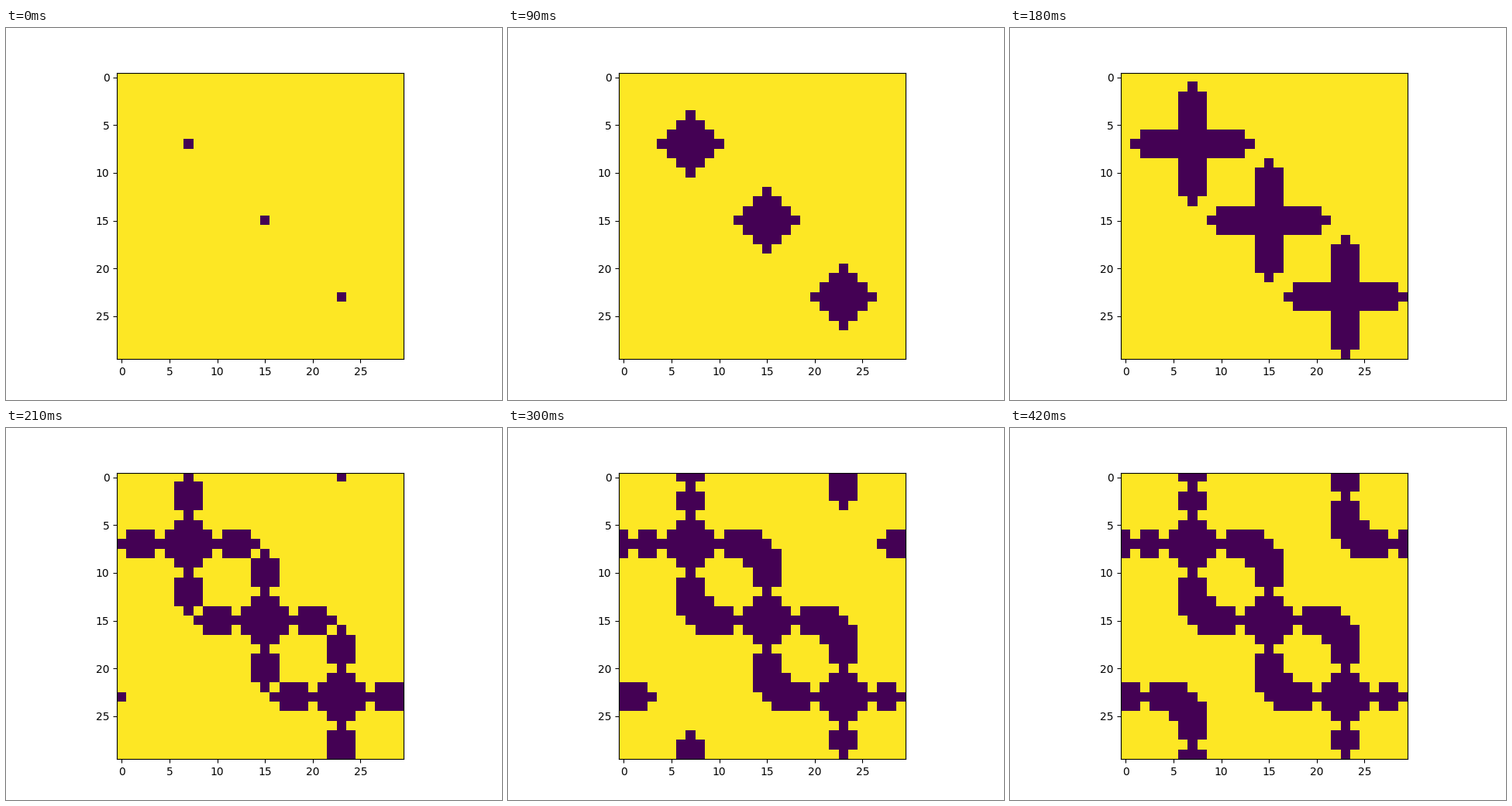
These frames come from a looping animation (640x480 px, 0.61 s). A matplotlib script:

```python
import numpy as np
import matplotlib.pyplot as plt
from matplotlib.animation import FuncAnimation

SIZE = 30
SEEDS = (7, 15, 23)
STEPS = 14       # growth steps until every arm has met another
TICK = 10        # ms per drawn frame
STEP_TICKS = 3   # drawn frames per growth step
LOOP_TICKS = 61
NECK_DELAY = 4   # steps between the tip passing and an arm pinching in
UP, DOWN, LEFT, RIGHT = (-1, 0), (1, 0), (0, -1), (0, 1)


def mark(grid, row, col):
    grid[row % SIZE, col % SIZE] = 0


def grow_arm(grid, seed, direction, reach, step):
    """Three cells wide, one-cell tip, a neck at every third cell."""
    dr, dc = direction
    length = min(step, reach)
    for d in range(length + 1):
        row, col = seed + d * dr, seed + d * dc
        mark(grid, row, col)
        neck = d > 0 and d % 3 == 0 and d + NECK_DELAY <= length
        if d < length and not neck:
            mark(grid, row + dc, col + dr)
            mark(grid, row - dc, col - dr)


def grow(step):
    grid = np.ones((SIZE, SIZE))
    for i, seed in enumerate(SEEDS):
        back = SEEDS[i] - SEEDS[i - 1]
        ahead = SEEDS[(i + 1) % len(SEEDS)] - seed
        for direction in (UP, LEFT):
            grow_arm(grid, seed, direction, back % SIZE, step)
        for direction in (DOWN, RIGHT):
            grow_arm(grid, seed, direction, ahead % SIZE, step)
        # the inner side of each bend fills in where two arms meet
        if step >= ahead % SIZE:
            end = seed + ahead % SIZE
            mark(grid, seed + 2, end - 2)
            mark(grid, end - 2, seed + 2)
    return grid


states = [grow(step) for step in range(STEPS + 1)]

fig, ax = plt.subplots(figsize=(6.4, 4.8), dpi=100)
image = ax.imshow(states[0], cmap="viridis", vmin=0, vmax=1,
                  interpolation="nearest")


def update(tick):
    image.set_data(states[min(tick // STEP_TICKS, STEPS)])
    return [image]


anim = FuncAnimation(fig, update, frames=LOOP_TICKS, interval=TICK,
                     repeat=True, repeat_delay=0, blit=False)
plt.show()
```
